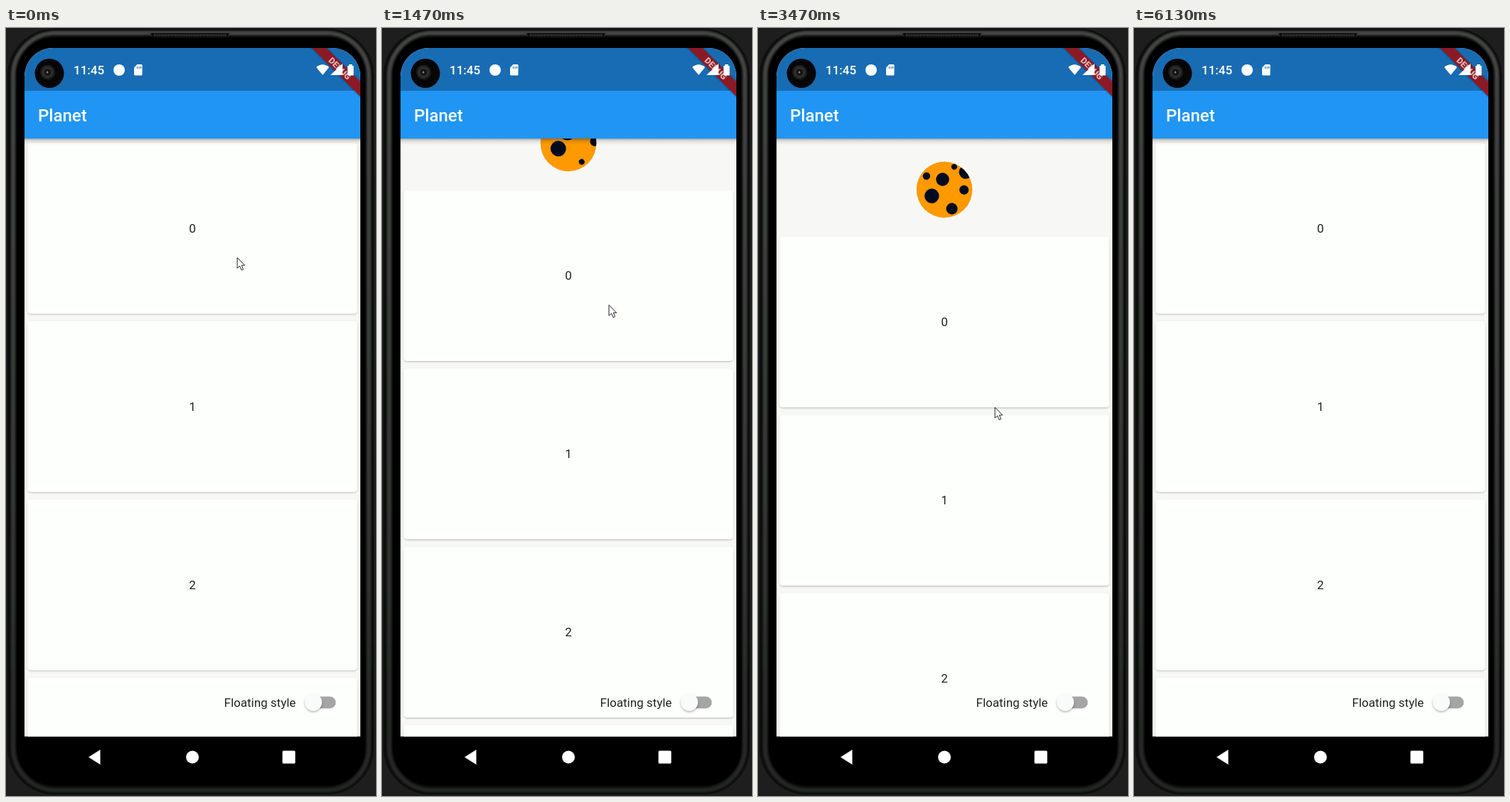
An HTML page for the animation above (6.34 s loop, 520 px wide and 1077 px high).

```html
<!DOCTYPE html>
<html lang="en">
<head>
<meta charset="utf-8">
<title>Planet pull to refresh</title>
<style>
  html, body { margin: 0; width: 100%; height: 100%; overflow: hidden; background: #1d1e1d; }
  svg { display: block; width: 100%; height: 100%; }
  text { font-family: Roboto, sans-serif; }
</style>
</head>
<body>
<svg viewBox="0 0 520 1077" preserveAspectRatio="none">
  <defs>
    <linearGradient id="rim" x2="0" y2="1">
      <stop offset="0" stop-color="#434543"/>
      <stop offset=".6" stop-color="#363836"/>
      <stop offset="1" stop-color="#242524"/>
    </linearGradient>
    <linearGradient id="drop" x2="0" y2="1">
      <stop offset="0" stop-color="#000" stop-opacity=".32"/>
      <stop offset=".4" stop-color="#000" stop-opacity=".1"/>
      <stop offset="1" stop-color="#000" stop-opacity="0"/>
    </linearGradient>
    <radialGradient id="lens">
      <stop offset="0" stop-color="#3c3c3c"/>
      <stop offset=".7" stop-color="#282828"/>
      <stop offset="1" stop-color="#0b0b0b"/>
    </radialGradient>
    <filter id="lift" x="-10%" y="-10%" width="120%" height="120%">
      <feDropShadow dx="0" dy="1.1" stdDeviation=".9" flood-opacity=".26"/>
    </filter>
    <filter id="knob" x="-40%" y="-40%" width="180%" height="180%">
      <feDropShadow dx="0" dy="1.5" stdDeviation="1.5" flood-opacity=".35"/>
    </filter>
    <filter id="soft" x="-5%" y="-5%" width="110%" height="110%"><feGaussianBlur stdDeviation="1.2"/></filter>
    <clipPath id="screen"><path d="M26 993.500V68a40 40 0 0 1 40-40H458a40 40 0 0 1 40 40V993.500Z"/></clipPath>
    <clipPath id="body"><rect x="26" y="155" width="472" height="839"/></clipPath>
    <clipPath id="disc"><circle r="39.300"/></clipPath>
  </defs>

  <rect width="520" height="1077" fill="#1d1e1d"/>
  <rect x="2" y="1" width="515" height="1074" rx="66" fill="#0d0e0d"/>
  <rect x="10" y="7" width="500" height="1062" rx="60" fill="none" stroke="url(#rim)" stroke-width="6" filter="url(#soft)"/>
  <rect x="15" y="13" width="490" height="1050" rx="54" fill="#000"/>
  <path d="M203 7H314Q312 13.500 306 13.500H211Q205 13.500 203 7Z" fill="#111"/>
  <path d="M208 10H309" stroke="#484848" stroke-width="3" stroke-dasharray="1 1.500"/>

  <g clip-path="url(#screen)">
    <rect x="26" y="28" width="472" height="966" fill="#f7f8f6"/>
    <g clip-path="url(#body)">
      <g id="planet"><g clip-path="url(#disc)">
        <circle r="40" fill="#ff9900"/>
        <g id="craters" fill="#000a1f" transform="rotate(-23)"></g>
      </g></g>
      <g id="list"></g>
      <rect x="26" y="155" width="472" height="9" fill="url(#drop)"/>
    </g>
    <rect x="26" y="28" width="472" height="60" fill="#186cb4"/>
    <rect x="26" y="88" width="472" height="67" fill="#2095f3"/>
    <text x="45" y="130.500" font-size="24" font-weight="500" fill="#fff">Planet</text>
    <g transform="translate(498 28) rotate(45)">
      <rect x="-55" y="33.600" width="110" height="14.800" fill="#000" opacity=".4" filter="url(#soft)"/>
      <rect x="-55" y="33.600" width="110" height="14.400" fill="#8c1a25"/>
      <text y="45" font-size="12" font-weight="900" fill="#d9b4b8" text-anchor="middle">DEBUG</text>
    </g>
    <text x="306.500" y="951.500" font-size="17" fill="#202120">Floating style</text>
    <rect x="424" y="937.500" width="39.500" height="16.800" rx="8.400" fill="#a5a5a5"/>
    <circle cx="432" cy="945.500" r="12" fill="#fafafa" filter="url(#knob)"/>
  </g>

  <g fill="#fff">
    <text x="95" y="65" font-size="17" font-weight="500">11:45</text>
    <circle cx="159" cy="59" r="8"/>
    <path d="M184.500 51H190Q191.500 51 191.500 52.500V65Q191.500 66.500 190 66.500H181.500Q180 66.500 180 65V55.500Z"/>
    <path d="M184.500 54v3M187 54v3M189.500 54v3" stroke="#186cb4" stroke-width="1.100"/>
    <path d="M436 55Q445 47.500 454 55L445 66Z"/>
    <path d="M456 66L473 50V66Z"/>
    <path d="M480 53H482V51H486.500V53H488.500V66.500H480Z"/>
    <path d="M116 1022.500L132.500 1012V1033Z"/>
    <circle cx="262" cy="1022.500" r="9"/>
    <rect x="388.500" y="1013.500" width="18" height="18" rx="1.500"/>
  </g>
  <circle cx="61" cy="63.500" r="20.500" fill="#060606"/>
  <circle cx="58.500" cy="62" r="11" fill="url(#lens)"/>
  <circle cx="58.500" cy="62" r="4.500" fill="#111"/>
  <circle cx="58" cy="62" r="1.500" fill="#808080"/>

  <path id="cursor" d="M0 0V15L3.500 11.800L6 17.500L8.500 16.400L6.200 10.900H10.700Z" fill="#fff" stroke="#222" stroke-width="1" stroke-linejoin="round"/>
</svg>
<script>
const NS = 'http://www.w3.org/2000/svg';
const LOOP = 6340, STEP = 1000 / 15;
const TURN = 90, STRIP = 3 * TURN;
const $ = id => document.getElementById(id);

function add(parent, tag, attrs, text) {
  const el = document.createElementNS(NS, tag);
  for (const key in attrs) el.setAttribute(key, attrs[key]);
  if (text !== undefined) el.textContent = text;
  return parent.appendChild(el);
}

function move(id, x, y) {
  $(id).setAttribute('transform', `translate(${x.toFixed(2)} ${y.toFixed(2)})`);
}

const ramp = (t, from, to) => Math.min(1, Math.max(0, (t - from) / (to - from)));
const smooth = f => f * f * (3 - 2 * f);

for (let i = 0; i < 4; i++) {
  const y = 161 + i * 250;
  add($('list'), 'rect', { x: 30.5, y, width: 463, height: 239.5, rx: 4.5, fill: '#fdfffd', filter: 'url(#lift)' });
  add($('list'), 'text', { x: 262, y: y + 126, 'font-size': 17, 'text-anchor': 'middle', fill: '#202120' }, i);
}

// One group of craters: along, across, radius, growth per turn.
const group = [
  [39, -10, 12, -2.5], [-16, -25, 4, 1.2], [1, -13, 6.5, 2.7], [-24, 1, 9.5, 0.7],
  [19, -22, 4, 0], [-9, 26, 12, -4], [15, 10, 6.5, 0]
];

// Each turn repeats the group, slightly spread and resized.
const craters = [0, 1, 2].flatMap(back => group.map(([along, across, r, growth], i) => ({
  along: along + (i - 1) * 2 * back + (2 - back) * TURN,
  el: add($('craters'), 'circle', { cy: across * (1 + back * 0.1), r: r + growth * back })
})));

function pointerAt(t) {
  const arc = t < 2040 ? Math.sin(Math.PI * t / 2040) : 0;
  const second = 210 * smooth(ramp(t, 2000, 2745));
  const leave = ramp(t, 4130, 4400);
  return {
    x: 325 + 16 * ramp(t, 0, 2000) - 23 * arc - 8 * ramp(t, 2530, 2780) + 164 * leave,
    y: 322 + 86 * arc + second + 17 * leave
  };
}

function pullAt(t) {
  if (t < 2780) return Math.min(180, (pointerAt(t).y - 322) * (t < 2040 ? 1 : 1.08));
  const settle = 120 + 60 * (1 - ramp(t, 2780, 4000)) ** 2;
  return settle * (1 - ramp(t, 5800, 6130));
}

function scrollAt(t) {
  return 14 * ramp(t, 2000, 2530) + 76 * ramp(t, 2530, 3470) + TURN * ramp(t, 3470, 5066);
}

function draw(ms) {
  const t = Math.floor((ms % LOOP + 5) / STEP) * STEP;
  const pull = pullAt(t), scroll = scrollAt(t), pointer = pointerAt(t);
  move('list', 0, pull);
  move('planet', 262, 95.3 + pull);
  move('cursor', pointer.x, pointer.y);
  $('cursor').setAttribute('visibility', t < 4420 ? 'visible' : 'hidden');
  for (const { along, el } of craters) {
    const x = (along - scroll + STRIP * 1.5) % STRIP - STRIP / 2;
    el.setAttribute('cx', x.toFixed(2));
  }
}

const start = performance.now();
function tick(now) {
  draw(Math.max(0, now - start));
  requestAnimationFrame(tick);
}
draw(0);
requestAnimationFrame(tick);
</script>
</body>
</html>
```
